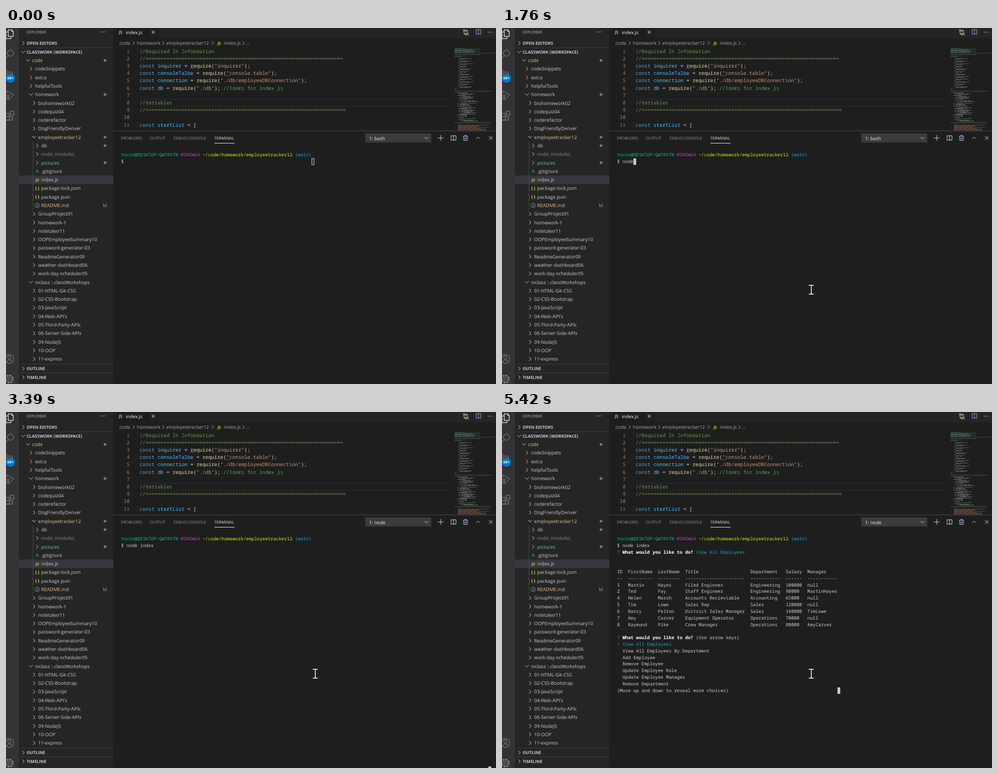
An HTML page that plays this animation: 877 px wide and 638 px high, repeating every 8 s.

```html
<!DOCTYPE html>
<html lang="en">
<head>
<meta charset="utf-8">
<title>Terminal session</title>
<style>
html, body { margin: 0; width: 100%; height: 100%; overflow: hidden; background: #1e1e1e; }
svg { display: block; }
text { text-rendering: geometricPrecision; font-family: "Open Sans", "Noto Sans", sans-serif; }
.mono { font-family: "Noto Sans Mono", "DejaVu Sans Mono", monospace; }
.bold { font-weight: 700; }
.middle { text-anchor: middle; }
.end { text-anchor: end; }
path { fill: none; stroke-width: 1; }
</style>
</head>
<body>
<svg width="877" height="638" viewBox="0 0 877 638">
  <g id="ui"></g>
  <text id="shell" x="650" y="200.5" font-size="8.4" fill="#f0f0f0"></text>
  <g id="term"></g>
  <rect id="caret" width="4.9" height="11.4"/>
  <g id="mouse">
    <path d="M-4.5 -8H-1L0 -7L1 -8H4.5M0 -7V7M-4.5 8H-1L0 7L1 8H4.5" stroke="#000" style="stroke-width:3"/>
    <path d="M-4.5 -8H-1L0 -7L1 -8H4.5M0 -7V7M-4.5 8H-1L0 7L1 8H4.5" stroke="#fff" style="stroke-width:1.5"/>
  </g>
</svg>
<script>
const $ = id => document.getElementById(id);
const GREY = '#cccccc', DIM = '#858585', MOD = '#e2c08d', GREEN = '#0dbc79', CYAN = '#11a8cd', YELLOW = '#cbcb41';

const rect = (x, y, w, h, fill) => `<rect x="${x}" y="${y}" width="${w}" height="${h}" fill="${fill}"/>`;
const path = (d, stroke = GREY, x = 0, y = 0) => `<path d="${d}" stroke="${stroke}" transform="translate(${x} ${y})"/>`;
const text = (x, y, s, fill = GREY, size = 8.5, cls = '') =>
  `<text xml:space="preserve" x="${x}" y="${y}" fill="${fill}" font-size="${size}" class="${cls}">${s}</text>`;
const dot = (x, y, r, fill) => `<circle cx="${x}" cy="${y}" r="${r}" fill="${fill}"/>`;
const ring = (x, y, r, stroke) => `<circle cx="${x}" cy="${y}" r="${r}" fill="none" stroke="${stroke}"/>`;
const closed = (x, y, c) => path('M-1.7 -3.3L1.6 0L-1.7 3.3', c, x, y);
const opened = (x, y, c) => path('M-3.3 -1.7L0 1.6L3.3 -1.7', c, x, y);
// Coloured runs: [colour, string, colour, string, ...]; a leading "*" makes a run bold.
const runs = parts => {
  let s = '';
  for (let i = 0; i < parts.length; i += 2) {
    const bold = parts[i][0] === '*';
    s += `<tspan fill="${parts[i].replace('*', '')}"${bold ? ' class="bold"' : ''}>${parts[i + 1]}</tspan>`;
  }
  return s;
};

function activityBar() {
  const c = DIM;
  return rect(0, 0, 23, 638, '#333333') +
    path('M4 3H10L13 6V15H4ZM10 3V6H13M4 7H0V19H9V15', '#fff') +
    ring(8, 45, 5.5, c) + path('M4 49L-2 56', c) +
    ring(2, 79, 2.5, c) + ring(9, 81, 2.5, c) + path('M2 82V94M9 84Q8 88 2 88', c) +
    dot(8, 90, 8, '#007acc') + text(8, 92.3, '5K+', '#fff', 6.3, 'bold middle') +
    path('M1 112L14 120L5 127M1 112V118', c) + ring(1, 124, 3.5, c) + path('M-2 124H5M4 121L7 119M4 127L7 129', c) +
    path('M0 153H6V165H0M0 159H12V165H0M8 149H14V156H8Z', c) +
    ring(6, 593, 8, c) + ring(6, 590.5, 3.2, c) + path('M0.5 599Q6 591 11.5 599', c) +
    ring(6, 629, 2.3, c) + `<circle cx="6" cy="629" r="6.5" fill="none" stroke="${c}" stroke-width="3" stroke-dasharray="2.6 2.5"/>` +
    ring(6, 629, 5.5, c);
}

const TREE = `0v code|1> codeSnippets|1> extra|1> helpfulTools|1v homework|2> biohomework02|2> codequiz04|2> coderefactor
2> DogFriendlyDenver|2v employeetracker12|3> db|3> node_modules|3> pictures|3g .gitignore|3j index.js|3b package-lock.json
3b package.json|3i README.md|2> GroupProject01|2> homework-1|2> notetaker11|2> OOPEmployeeSummary10|2> password-generator-03
2> ReadmeGenerator09|2> weather-dashboard06|2> work-day-scheduler05|1v inclass <tspan fill="#808080">\\</tspan> classWorkshops
2> 01-HTML-Git-CSS|2> 02-CSS-Bootstrap|2> 03-JavaScript|2> 04-Web-API's|2> 05-Third-Party-APIs|2> 06-Server-Side-APIs
2> 09-NodeJS|2> 10-OOP|2> 11-express`.split(/[|\n]/);
const TINT = { code: MOD, homework: MOD, employeetracker12: MOD, db: MOD, 'README.md': MOD, pictures: '#73c991', node_modules: '#8c8c8c' };
const ICON = {
  '>': closed,
  v: opened,
  g: (x, y) => rect(x - 2.5, y - 2.5, 5, 5, '#41535b'),
  j: (x, y) => text(x, y + 2.8, 'JS', YELLOW, 7, 'bold middle'),
  b: (x, y) => text(x, y + 2.4, '{ }', YELLOW, 7.5, 'bold middle'),
  i: (x, y) => ring(x, y, 3.7, '#519aba') + path('M0 -2.3V-1.2M0 -0.4V2.3', '#519aba', x, y),
};

function sidebar() {
  let s = rect(23, 0, 169, 638, '#252526') + rect(23, 264.4, 169, 15.3, '#37373d');
  s += text(37, 10.3, 'EXPLORER', '#bbbbbb', 7.2) + [170.5, 174, 177.5].map(x => dot(x, 7, 0.8, GREY)).join('');
  s += closed(31, 27, GREY) + opened(31, 43, GREY);
  s += text(37, 29.8, 'OPEN EDITORS', GREY, 7.5, 'bold') + text(37, 45.8, 'CLASSWORK (WORKSPACE)', GREY, 7.6, 'bold');
  s += rect(23, 35, 169, 0.8, '#3f3f40');
  s += rect(48, 203, 0.8, 122, '#515151');
  TREE.forEach((row, i) => {
    const depth = +row[0], kind = row[1], name = row.slice(3), tint = TINT[name] || GREY;
    const y = 58 + i * 15.286, x = 39.2 + depth * 5.57;
    s += ICON[kind](x, y, GREY) + text(x + 7.2, y + 3.1, name, tint, 8.55);
    if (name === 'README.md') s += text(177, y + 3, 'M', '#b59a73', 8.3, 'middle');
    else if (tint === MOD) s += dot(177.3, y, 2.6, '#836f54');
    else if (name === 'pictures') s += dot(177.3, y, 2.6, '#3d8a5b');
  });
  ['OUTLINE', 'TIMELINE'].forEach((label, i) => {
    const y = 610.5 + i * 15.5;
    s += rect(23, y - 8.2, 169, 0.8, '#3f3f40') + closed(31, y, GREY) + text(37, y + 2.8, label, GREY, 7.5, 'bold');
  });
  return s;
}

const requireLine = (name, pkg, tail = []) =>
  ['#569cd6', 'const ', '#4fc1ff', name, '#d4d4d4', ' = ', '#dcdcaa', 'require', '#d4d4d4', '(', '#ce9178', `"${pkg}"`, '#d4d4d4', ');', ...tail];
const COMMENT = '#6a9955';
const CODE = [
  [COMMENT, '//Required In Information'],
  [COMMENT, '//' + '='.repeat(66)],
  requireLine('inquirer', 'inquirer'),
  requireLine('consoleTalbe', 'console.table'),
  requireLine('connection', './db/employeeDBConnection'),
  requireLine('db', './db', [COMMENT, ' //looks for index.js']),
  [],
  [COMMENT, '//Variables'],
  [COMMENT, '//' + '='.repeat(67)],
  [],
  ['#569cd6', 'const ', '#4fc1ff', 'startList', '#d4d4d4', ' = ['],
  ['#d4d4d4', '{'],
];

function minimap() {
  let seed = 7, s = '';
  const rnd = () => (seed = seed * 16807 % 2147483647) / 2147483647;
  const bar = (x, y, w, c) => {
    for (const end = x + w; x < end;) {
      const n = 2 + rnd() * 6;
      s += rect(x.toFixed(1), y.toFixed(1), Math.min(n, end - x).toFixed(1), 0.9, c);
      x += n + 0.8;
    }
  };
  [18, 46, 34, 38, 46, 34].forEach((w, i) => bar(803, 36 + i * 1.4, w, i < 2 ? '#46633b' : i % 2 ? '#47728a' : '#7b6558'));
  s += rect(803, 44.6, 72, 1.2, '#24435a');
  bar(803, 47.2, 47, '#46633b');
  bar(803, 50.2, 14, '#55788a');
  for (let i = 0; i < 12; i++) {
    const y = 53 + i * 4.6;
    bar(809, y, 2, '#777');
    bar(812, y + 1.4, 12 + rnd() * 14, '#7c6356');
    bar(812, y + 2.8, 9 + rnd() * 9, '#4c7488');
  }
  bar(803, 109, 3, '#777');
  s += rect(803, 112.8, 65, 0.9, '#46633b');
  for (let y = 116, i = 0; y < 167; y += 1.4, i++)
    bar(807 + (i * 5 % 14), y, 6 + rnd() * 20, ['#777a7d', '#4c7488', '#7c6356', '#77775f'][i % 4]);
  s += rect(803, 169, 65, 0.9, '#46633b');
  for (let y = 173.5, i = 0; y < 184; y += 1.5, i++) bar(809, y, 32 + rnd() * 34, i % 3 ? '#84564b' : '#8d4548');
  return s;
}

const splitIcon = (x, y, c = GREY) => path('M-4.3 -4H4.3V4H-4.3ZM0 -4V4', c, x, y);

function editor() {
  let s = rect(192, 0, 685, 638, '#1e1e1e') + rect(274, 0, 603, 18.5, '#252526');
  s += text(202, 10, 'JS', YELLOW, 7, 'bold') + text(214.5, 10.6, 'index.js', '#fff', 8.3);
  s += path('M-2.8 -2.8L2.8 2.8M2.8 -2.8L-2.8 2.8', '#fff', 263.5, 7.5);
  s += ring(820, 4.5, 1.5, GREY) + ring(826, 11, 1.5, GREY) + path('M820 6V11H823M822 9L824 11L822 13M826 9.5V4.5H823M824 2.5L822 4.5L824 6.5');
  s += splitIcon(845.5, 7, '#b180d7') + [863.5, 867, 870.5].map(x => dot(x, 7.5, 0.8, GREY)).join('');
  const crumb = '#a9a9a9';
  [[203, 'code'], [234, 'homework'], [287, 'employeetracker12'], [390, 'index.js'], [430, '...']].forEach(([x, w]) => s += text(x, 30.2, w, crumb));
  [228.5, 281.5, 370, 425].forEach(x => s += closed(x, 27, crumb));
  s += text(378.5, 29.7, 'JS', YELLOW, 7, 'bold');
  s += rect(239, 127, 559, 0.8, '#303030') + rect(239, 139.8, 559, 0.8, '#303030');
  CODE.forEach((line, i) => {
    const y = 44.5 + i * 13.2;
    s += text(221.3, y, i + 1, DIM, 8.93, 'mono end') + text(239, y, runs(line), GREY, 8.93, 'mono');
  });
  [[331, 72.6], [394, 85.8]].forEach(([x, y]) => [0, 2.5, 5].forEach(dx => s += dot(x + dx, y, 0.6, '#aaa')));
  return s + minimap();
}

function panel() {
  let s = rect(192, 184, 685, 454, '#1e1e1e') + rect(192, 184, 685, 0.9, '#4a4a4a');
  [[206, 'PROBLEMS'], [257, 'OUTPUT'], [299.5, 'DEBUG CONSOLE'], [373, 'TERMINAL']].forEach(([x, w], i) =>
    s += text(x, 200, w, i === 3 ? '#e7e7e7' : '#969696', 7.2));
  s += rect(373, 206, 36, 0.9, '#e7e7e7') + rect(643, 189, 118, 16.2, '#3c3c3c') + opened(752.5, 197.3, GREY);
  s += path('M773 197H783M778 192V202') + splitIcon(801, 197);
  s += path('M818 194H827M821 194V192.3H824V194M819 194V201.5H826V194M821.5 196V200M823.5 196V200', '#b9a5d6');
  s += path('M-3.5 1.8L0 -1.7L3.5 1.8', GREY, 845, 197) + path('M-3 -3L3 3M3 -3L-3 3', GREY, 867.5, 197);
  return s;
}

$('ui').innerHTML = editor() + panel() + sidebar() + activityBar();

const CELL = 4.87, LINE = 11.81;
const QUESTION = [GREEN, '? ', '*#ffffff', 'What would you like to do? '];
const MENU = [
  [...QUESTION, GREY, '(Use arrow keys)'],
  [CYAN, '> View All Employees'],
  ...['View All Employees By Department', 'Add Employee', 'Remove Employee', 'Update Employee Role',
    'Update Employee Manager', 'Remove Department'].map(s => [GREY, '  ' + s]),
  [GREY, '(Move up and down to reveal more choices)'],
];
const WIDTHS = [2, 9, 8, 22, 11, 6, 11];
const TABLE = [
  'ID,FirstName,LastName,Title,Department,Salary,Manager',
  WIDTHS.map(w => '-'.repeat(w)).join(),
  '1,Martin,Hayes,Filed Enginner,Engineering,100000,null',
  '2,Ted,Fay,Staff Engineer,Engineering,90000,MartinHayes',
  '4,Helen,Marsh,Accounts Recieviable,Accounting,65000,null',
  '5,Tim,Lowe,Sales Rep,Sales,120000,null',
  '6,Barry,Felton,District Sales Manager,Sales,140000,TimLowe',
  '7,Amy,Carver,Equipment Operator,Operations,70000,null',
  '8,Raymond,Pike,Crew Manager,Operations,80000,AmyCarver',
].map(row => [GREY, row.split(',').map((s, i) => s.padEnd(WIDTHS[i] + 2)).join('')]);
const PROMPT = [GREEN, 'tovin@DESKTOP-QW7RXTN ', '#bc3fbc', 'MINGW64 ', '#e5e510', '~/code/homework/employeetracker12 ', CYAN, '(main)'];
const COMMAND = 'node index';
const KEYS = [1300, 1380, 1530, 1760, 2000, 2140, 2220, 2310, 2540, 2690];
const TRAIL = [[727, 545], [684, 512], [618, 486], [548, 471], [499, 464], [519, 466], [544, 468], [553.5, 469]];

function caretCell(t, typed) {
  if (t < 1300) return [70, 1];
  if (t < 3320) return [2 + typed, 1];
  if (t < 3870) return [135, 35];
  if (t < 5360) return [45, 10];
  if (t < 5420) return [135, 10];
  return [81, 23];
}

let shown = '';
function draw(t) {
  const typed = KEYS.filter(k => t >= k).length;
  const lines = [PROMPT, [GREY, '$ ' + COMMAND.slice(0, typed)]];
  if (t >= 5420) lines.push([...QUESTION, CYAN, 'View All Employees'], [], [], ...TABLE, [], ...MENU);
  else if (t >= 3870 && t < 5360) lines.push(...MENU);
  const html = lines.map((line, i) => text(206, 230 + i * LINE, runs(line), GREY, CELL / 0.6, 'mono')).join('');
  if (html !== shown) $('term').innerHTML = shown = html;

  $('shell').textContent = t < 3390 ? '1: bash' : '1: node';

  const [col, row] = caretCell(t, typed), focused = t >= 600, inset = focused ? 0 : 0.5;
  const attrs = {
    x: 206 + col * CELL + inset, y: 233.7 + (row - 1) * LINE + inset,
    width: 4.9 - 2 * inset, height: 11.6 - 2 * inset,
    fill: focused ? GREY : 'none', stroke: focused ? 'none' : GREY,
  };
  for (const k in attrs) $('caret').setAttribute(k, attrs[k]);

  const step = Math.min(7, Math.floor((t - 70) / 530 * 7 + 1e-6));
  $('mouse').setAttribute('visibility', step < 0 ? 'hidden' : 'visible');
  if (step >= 0) $('mouse').setAttribute('transform', `translate(${TRAIL[step]})`);
}

function tick() {
  draw(performance.now() % 8000);
  requestAnimationFrame(tick);
}
tick();
</script>
</body>
</html>
```
